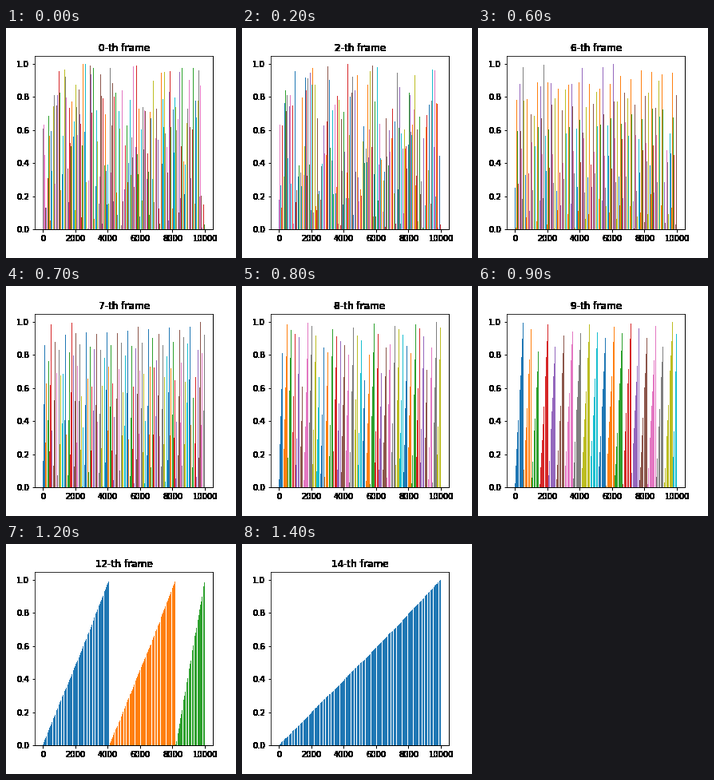
A matplotlib script for the animation above (1.5 s loop, 288 px wide and 288 px high).

```python
import numpy as np
import matplotlib.pyplot as plt
from matplotlib.animation import FuncAnimation

COUNT = 10000
FRAMES = 15
STEP_MS = 100
BAR_WIDTH = 0.8

values = np.random.default_rng(17).random(COUNT)


def sorted_runs(size):
    """Values after the merge pass that leaves sorted runs of this size."""
    return np.concatenate(
        [np.sort(values[i:i + size]) for i in range(0, COUNT, size)])


def harden(threshold):
    """Filter that makes pixels above the alpha threshold solid black."""
    def apply(img, dpi):
        out = np.zeros_like(img)
        alpha = img[..., 3]
        out[..., 3] = np.where(alpha > threshold, 1, alpha)
        return out, 0, 0
    return apply


fig, ax = plt.subplots(figsize=(4, 4), dpi=72, facecolor="white")
fig.subplots_adjust(left=0.125, right=0.9, bottom=0.125, top=0.88)

first, last = -BAR_WIDTH / 2, COUNT - 1 + BAR_WIDTH / 2
margin = 0.05 * (last - first)
ax.set_xlim(first - margin, last + margin)
ax.set_ylim(0, 1.05 * values.max())
ax.set_xticks(range(0, COUNT + 1, 2000))
ax.set_yticks(np.arange(6) / 5)
title = ax.set_title("0-th frame")

# Everything outside the axes background is drawn without soft edges.
crisp = [title, ax.spines["bottom"], ax.spines["right"],
         *ax.get_xticklabels(), *ax.get_yticklabels()]
for artist in crisp:
    artist.set_agg_filter(harden(0))
for tick in [*ax.get_xticklines(), *ax.get_yticklines()]:
    tick.set_agg_filter(harden(0.5))


def pixel_edge(x):
    points = np.column_stack([x, np.zeros(len(x))])
    return np.floor(ax.transData.transform(points)[:, 0] + 0.5)


# Bars are far thinner than a pixel: only those crossing a pixel centre show.
index = np.arange(COUNT)
shown = index[pixel_edge(index - BAR_WIDTH / 2)
              != pixel_edge(index + BAR_WIDTH / 2)]
bars = ax.bar(shown, values[shown], BAR_WIDTH)


def update(level):
    size = 2 ** level
    heights = sorted_runs(size)
    for i, bar in zip(shown, bars):
        bar.set_height(heights[i])
        bar.set_facecolor(f"C{i // size % 10}")
    title.set_text(f"{level}-th frame")
    return [title, *bars]


anim = FuncAnimation(fig, update, frames=FRAMES, interval=STEP_MS,
                     repeat=True, repeat_delay=0)
plt.show()
```
